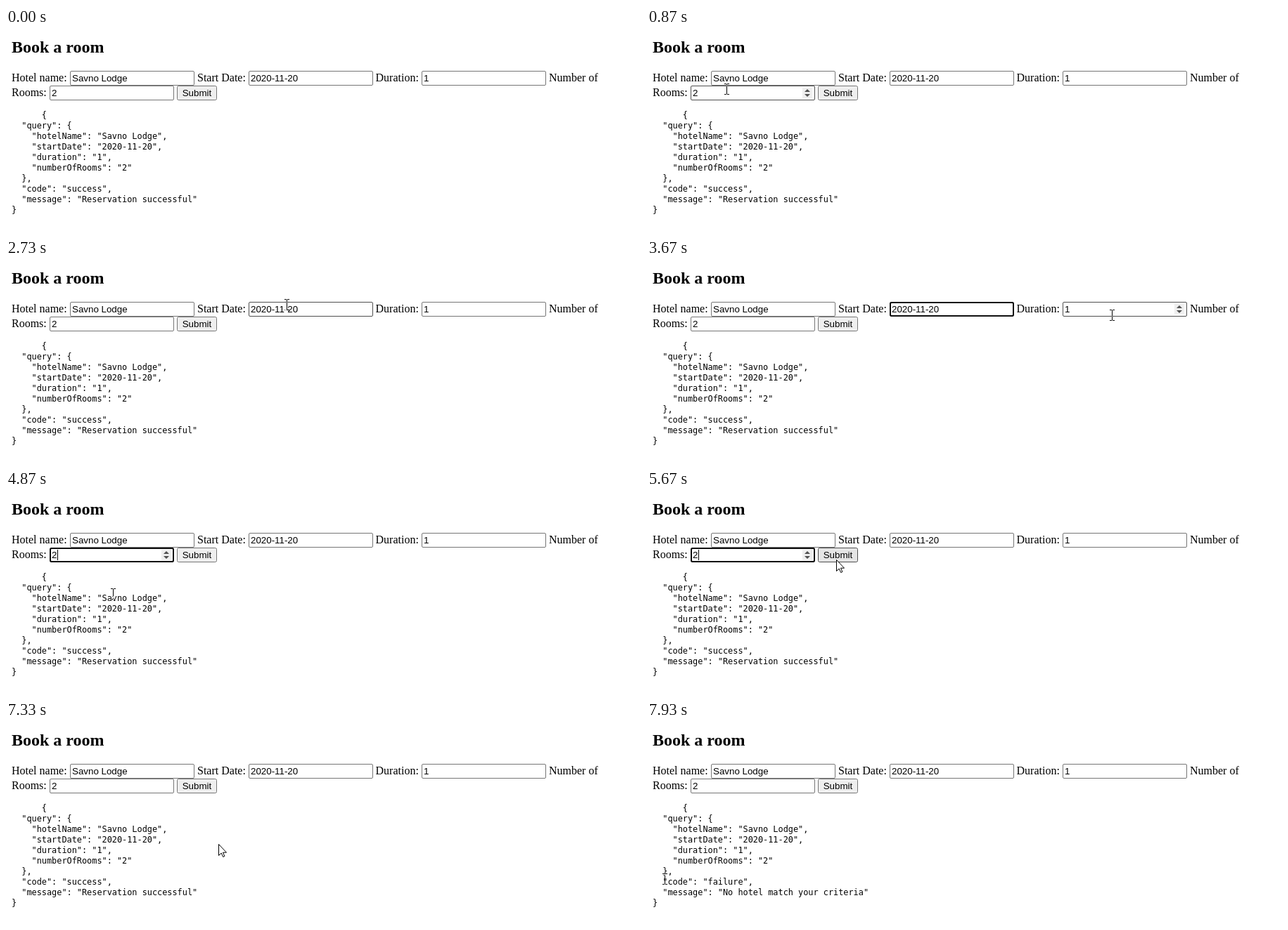
Recreate the animation shown at these times as an HTML page. Size 903x289 px, loop 8000 ms.

```html
<!DOCTYPE html>
<html lang="en">
<head>
<meta charset="utf-8">
<title>Book a room</title>
<style>
  html, body { margin: 0; width: 100%; height: 100%; overflow: hidden; background: #fff; }
  svg { display: block; width: 903px; height: 289px; }
  text { white-space: pre; fill: #000; }
  .title { font: bold 24px "Liberation Serif", "Times New Roman", serif; }
  .label { font: 16px "Liberation Serif", "Times New Roman", serif; }
  .value { font: 13.333px "Liberation Sans", Arial, sans-serif; }
  .json { font: 11.87px "DejaVu Sans Mono", "Noto Sans Mono", monospace; }
  .beam { fill: #fff; mix-blend-mode: difference; shape-rendering: crispEdges; }
</style>
</head>
<body>
<svg id="stage" viewBox="0 0 903 289" xmlns="http://www.w3.org/2000/svg">
  <rect width="903" height="289" fill="#fff"/>
</svg>
<script>
const LOOP = 8000, FPS = 15, BLINK = 533;
const ROW = 21, FIELD_W = 177, LINE_TOP = 117, LINE_H = 15, CHAR_W = 7.147;
const ENTER = 7, PRESS = 89, RELEASE = 91, ANSWER = 112;   // in steps of 1/15 s
const HOTEL = "Savno Lodge";
const stage = document.getElementById("stage");

function add(tag, attrs, parent = stage, content = "") {
  const node = document.createElementNS("http://www.w3.org/2000/svg", tag);
  for (const key in attrs) node.setAttribute(key, attrs[key]);
  node.textContent = content;
  parent.appendChild(node);
  return node;
}
const write = (cls, x, y, str) => add("text", { class: cls, x, y }, stage, str);
const show = (node, on) => node.setAttribute("visibility", on ? "visible" : "hidden");

write("title", 8, 35, "Book a room");

function makeField(label, labelX, x, y, value, caretAt, focus, spin) {
  write("label", labelX, y + 15, label);
  const box = add("rect", { x: x + .5, y: y + .5, width: FIELD_W - 1, height: ROW - 1, rx: 1.5, fill: "#fff" });
  const ring = add("rect", { x: x + 1, y: y + 1, width: FIELD_W - 2, height: ROW - 2, rx: 2,
    fill: "none", stroke: "#101010", "stroke-width": 2 });
  const text = write("value", x + 3, y + 15, value);
  const caretX = x + 3 + Math.ceil(text.getSubStringLength(0, caretAt) + .5);
  const caret = add("rect", { x: caretX, y: y + 3, width: 1, height: 15 });
  const arrows = add("g", { transform: `translate(${x + 159} ${y + 3})` });
  add("rect", { width: 14, height: 15, fill: "#efefef" }, arrows);
  add("path", { d: "M3 6 7 2 11 6ZM3 9 7 13 11 9Z", fill: "#505050" }, arrows);
  return { x, y, w: FIELD_W, box, ring, caret, arrows, focus, spin };
}
const fields = [
  makeField("Hotel name:", 8, 91, 61, HOTEL, 3, [20, 38], false),
  makeField("Start Date:", 272, 345, 61, "2020-11-20", 7, [47, 56], false),
  makeField("Duration:", 525.5, 591, 61, "1", 1, [56, 69], true),
  makeField("Rooms:", 8, 62, 82, "2", 1, [69, PRESS], true)
];
write("label", 772, 76, "Number of");

const submit = { x: 243, y: 82, w: 57 };
submit.box = add("rect", { x: 243.5, y: 82.5, width: 56, height: ROW - 1, rx: 2 });
write("value", 250.7, 97, "Submit");

const reply = (code, message) => [
  "      {",
  '  "query": {',
  `    "hotelName": "${HOTEL}",`,
  '    "startDate": "2020-11-20",',
  '    "duration": "1",',
  '    "numberOfRooms": "2"',
  "  },",
  `  "code": "${code}",`,
  `  "message": "${message}"`,
  "}"
];
const success = reply("success", "Reservation successful");
const failure = reply("failure", "No hotel match your criteria");
const rows = success.map((line, i) => write("json", 8, LINE_TOP + 11 + i * LINE_H, line));

const beam = add("path", { class: "beam",
  d: "M-3-9h3v1h1v-1h3v1h-3v14h3v1h-3v-1h-1v1h-3v-1h3v-14h-3z" });
const arrow = add("path", { fill: "#fff", stroke: "#000",
  d: "M.5.5V16.5L4.2 13 6.7 18.5 8.9 17.5 6.5 12.2H11.5Z" });

// Pointer moves: first step, last step, where it ends
const moves = [
  { from: 6, to: 14, x: 118, y: 80 },
  { from: 21, to: 26, x: 145, y: 82 },
  { from: 26, to: 32, x: 399, y: 66 },
  { from: 47, to: 53, x: 661, y: 81 },
  { from: 57, to: 66, x: 150, y: 97 },
  { from: 72, to: 73, x: 152, y: 149 },
  { from: 73, to: 76, x: 190, y: 195 },
  { from: 76, to: 86, x: 271, y: 96 },
  { from: 96, to: 98, x: 278, y: 119 },
  { from: 102, to: 107, x: 302, y: 175 },
  { from: 111, to: 119, x: 25, y: 226 }
];
const ease = k => k * k * (3 - 2 * k);

function pointerAt(step) {
  let x = 0, y = 259;
  for (const m of moves) {
    const k = ease(Math.min(1, Math.max(0, (step - m.from) / (m.to - m.from))));
    x += (m.x - x) * k;
    y += (m.y - y) * k;
  }
  return [Math.round(x), Math.round(y)];
}

function draw(t) {
  const step = Math.floor((t + 5) * FPS / 1000) % (LOOP * FPS / 1000);
  const visible = step >= ENTER;
  const [px, py] = pointerAt(step);
  const over = r => visible && px >= r.x && px < r.x + r.w && py >= r.y && py < r.y + ROW;
  const lines = step < ANSWER ? success : failure;

  let onText = false;
  for (const f of fields) {
    const hover = over(f);
    const [from, to] = f.focus;
    const focused = step >= from && step < to;
    const lit = Math.floor((step - from) * 1000 / FPS / BLINK) % 2 === 0;
    f.box.setAttribute("stroke", hover ? "#4f4f4f" : "#767676");
    show(f.ring, focused);
    show(f.caret, focused && lit);
    show(f.arrows, f.spin && (hover || focused));
    onText = onText || hover;
  }

  const hot = over(submit), pressed = step >= PRESS && step < RELEASE;
  submit.box.setAttribute("fill", pressed ? "#f5f5f5" : hot ? "#e5e5e5" : "#efefef");
  submit.box.setAttribute("stroke", pressed ? "#8d8d8d" : hot ? "#4f4f4f" : "#767676");

  rows.forEach((row, i) => {
    if (row.textContent !== lines[i]) row.textContent = lines[i];
  });
  const line = lines[Math.floor((py - LINE_TOP) / LINE_H)];
  if (line && px >= 8 && px < 8 + line.length * CHAR_W) onText = true;
  if (py >= 61 && py < 82 && px >= 8 && px < 843) onText = true;

  show(beam, visible && onText);
  show(arrow, visible && !onText);
  for (const c of [beam, arrow]) c.setAttribute("transform", `translate(${px} ${py})`);
}

const start = performance.now();
function tick() {
  draw((performance.now() - start) % LOOP);
  requestAnimationFrame(tick);
}
tick();
</script>
</body>
</html>
```
